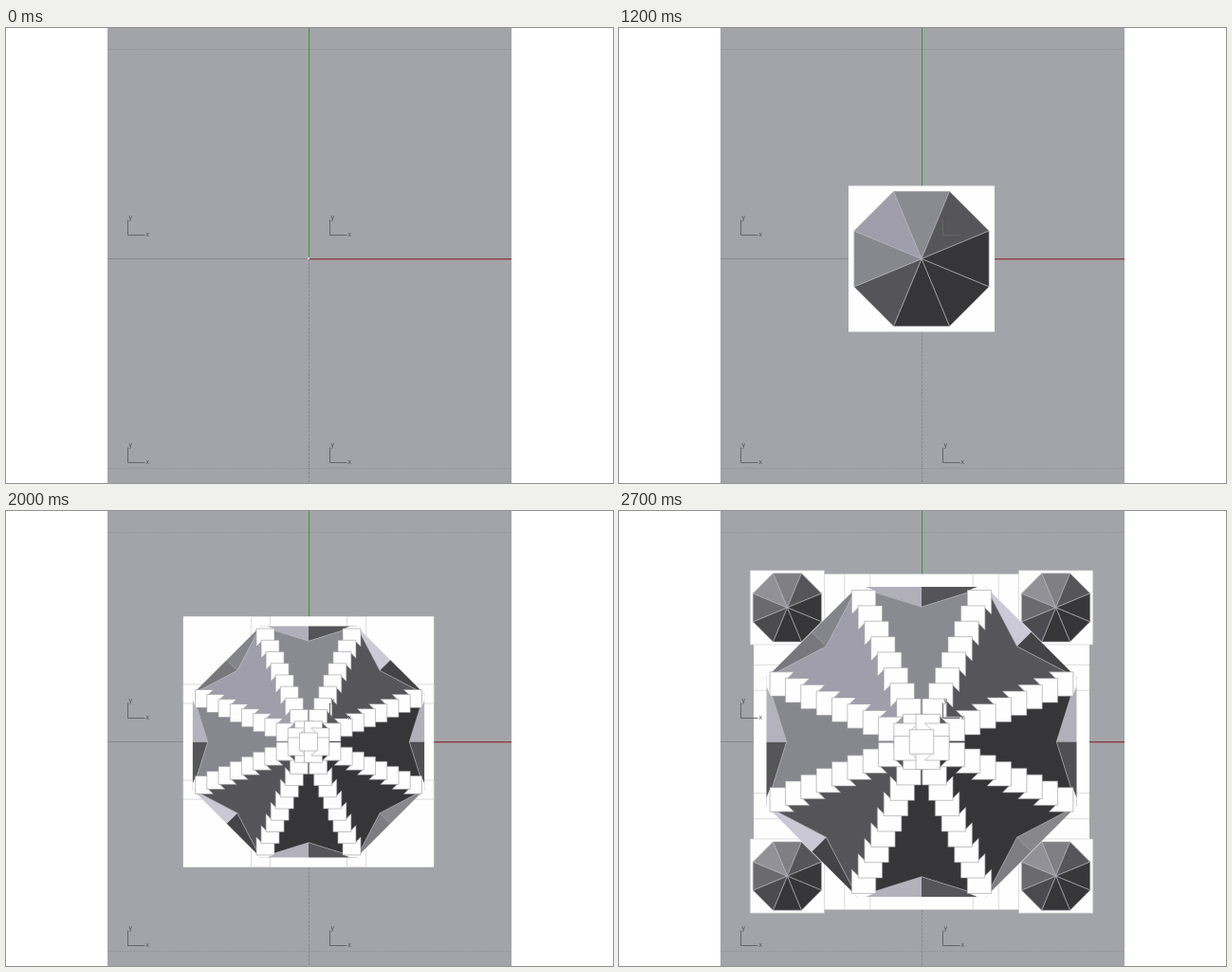
An HTML page with a canvas for the animation above (2900 ms loop, 640 by 480 pixels).

```html
<!DOCTYPE html>
<html>
<head>
<meta charset="utf-8">
<style>
  html, body { margin: 0; height: 100%; overflow: hidden; background: #fff; }
  canvas { display: block; }
</style>
</head>
<body>
<canvas id="stage" width="640" height="480"></canvas>
<script>
const ctx = document.getElementById('stage').getContext('2d');
const LOOP = 2900, STEP = 100, LAST = 27;
const STAIRS_FROM = 15, STAR_FROM = 19, TOWERS_FROM = 26;
const CX = 319, CY = 243.5;
const WHITE = '#fefefe', EDGE = '#b4b2bb', SEAM = '#98989c', FAINT = '#c4c4c8';
const APOTHEM = Math.cos(Math.PI / 8), HALF_SIDE = Math.sin(Math.PI / 8);
const NOTCH = 0.804;

// The uneven growth of a slider dragged by hand: [step, half width]
const GROWTH = [[0, 0], [8, 52.5], [12, 77], [17, 110.5], [18, 119.5], [24, 157.5], [27, 177]];

// Clockwise from the top facet
const ROOF = ['#8a8a91', '#56555a', '#363638', '#363638', '#363638', '#555559', '#87878e', '#a09eaa'];
const TOWER_ROOF = ['#7f7f84', '#56565a', '#38383a', '#363638', '#363638', '#4b4b4f', '#6a6a6f', '#919197'];
const NOTCH_SIDES = [
  ['#b1afba', '#555459'], ['#cbcad6', '#444447'], ['#b1afba', '#505054'], ['#87878c', '#7d7d82'],
  ['#56555a', '#b3b1bc'], ['#444448', '#c9c8d4'], ['#55555a', '#b4b2bd'], ['#77777d', '#84848b']
];

function sizeAt(n) {
  const i = GROWTH.findIndex(([step]) => step >= n);
  const [n0, s0] = GROWTH[Math.max(0, i - 1)], [n1, s1] = GROWTH[i];
  return n === n1 ? s1 : s0 + (s1 - s0) * (n - n0) / (n1 - n0);
}

function polar(radius, eighths) {
  const a = (eighths - 2) * Math.PI / 4;
  return [radius * Math.cos(a), radius * Math.sin(a)];
}

function poly(points, fill, stroke) {
  ctx.beginPath();
  points.forEach(p => ctx.lineTo(p[0], p[1]));
  ctx.closePath();
  ctx.fillStyle = fill;
  ctx.fill();
  if (stroke) {
    ctx.strokeStyle = stroke;
    ctx.stroke();
  }
}

function square(x, y, half, stroke) {
  poly([[x - half, y - half], [x + half, y - half], [x + half, y + half], [x - half, y + half]], WHITE, stroke);
}

function line(x1, y1, x2, y2, color, dash = []) {
  ctx.setLineDash(dash);
  ctx.strokeStyle = color;
  ctx.beginPath();
  ctx.moveTo(x1, y1);
  ctx.lineTo(x2, y2);
  ctx.stroke();
  ctx.setLineDash([]);
}

// Draws in unit coordinates, scaled and moved, with thin lines of constant width
function scaled(x, y, size, draw) {
  ctx.save();
  ctx.translate(x, y);
  ctx.scale(size, size);
  ctx.lineWidth = 0.6 / size;
  draw();
  ctx.restore();
}

// Repeats a drawing made for the upper left rib on all eight ribs
function eachRib(draw) {
  for (const sx of [1, -1]) for (const sy of [1, -1]) for (const swap of [0, 1]) {
    ctx.save();
    ctx.scale(sx, sy);
    if (swap) ctx.transform(0, 1, 1, 0, 0, 0);
    draw();
    ctx.restore();
  }
}

function roof(colors, star) {
  colors.forEach((color, i) => {
    const a = polar(1, i - 0.5), b = polar(1, i + 0.5);
    if (star) {
      const notch = polar(NOTCH, i), mid = polar(APOTHEM, i);
      poly([a, mid, notch], NOTCH_SIDES[i][0]);
      poly([mid, b, notch], NOTCH_SIDES[i][1]);
      poly([[0, 0], a, notch, b], color, EDGE);
    } else {
      poly([[0, 0], a, b], color, EDGE);
    }
  });
}

// Blocks sit at tenths of each rib; the sloping roof cuts off their inner corners
function stairs() {
  const half = 0.072, cut = 0.03;
  eachRib(() => poly([
    [-HALF_SIDE, -APOTHEM], [0.05 - HALF_SIDE, -APOTHEM],
    [half - 0.9 * HALF_SIDE, -0.9], [-half - 0.9 * HALF_SIDE, -0.9]
  ], WHITE));
  for (let tenth = 9; tenth > 0; tenth--) {
    const x = -HALF_SIDE * tenth / 10, y = -APOTHEM * tenth / 10;
    eachRib(() => poly([
      [x - half, y - half], [x + half, y - half], [x + half, y + cut],
      [x - cut, y + cut], [x - half, y + half]
    ], WHITE, SEAM));
  }
  square(0, 0, half, SEAM);
}

function towers(size) {
  for (const sx of [-1, 1]) for (const sy of [-1, 1]) {
    scaled(CX + sx * size * 0.8, CY + sy * size * 0.8, size * 0.221, () => {
      square(0, 0, 1, FAINT);
      roof(TOWER_ROOF, false);
    });
  }
}

function building(n) {
  const size = sizeAt(n), hasStairs = n >= STAIRS_FROM;
  scaled(CX, CY, size, () => {
    square(0, 0, 1);
    if (hasStairs) eachRib(() => square(-HALF_SIDE, -APOTHEM, 1 - APOTHEM, FAINT));
  });
  if (n >= TOWERS_FROM) towers(size);
  scaled(CX, CY, size, () => {
    roof(ROOF, n >= STAR_FROM);
    if (hasStairs) stairs();
  });
}

function viewport() {
  ctx.fillStyle = '#fff';
  ctx.fillRect(0, 0, 640, 480);
  ctx.fillStyle = '#a3a4a9';
  ctx.fillRect(107, 0, 426, 480);
  ctx.lineWidth = 1;
  line(107, 22.5, 533, 22.5, '#95969b', [2, 1]);
  line(107, 464.5, 533, 464.5, '#95969b', [2, 1]);
  line(107, 243.5, 319, 243.5, '#88898e');
  line(319.5, 244, 319.5, 480, '#88898e', [3, 1]);
  line(319, 243.5, 533, 243.5, '#7f4347');
  line(319, 244.5, 533, 244.5, '#a8787c');
  line(319.5, 0, 319.5, 242, '#2f9a35');
  ctx.fillStyle = '#d0d1d4';
  ctx.fillRect(318, 242, 2, 2);
}

function axisIcons() {
  ctx.font = '7px "Liberation Sans", Arial, sans-serif';
  ctx.lineWidth = 1;
  for (const x of [128.5, 341.5]) for (const y of [218.5, 458.5]) {
    line(x, y - 16, x, y, '#65666b');
    line(x, y, x + 18, y, '#65666b');
    ctx.fillStyle = '#505156';
    ctx.fillText('y', x + 1, y - 17);
    ctx.fillText('x', x + 19, y + 1);
  }
}

function frame(now) {
  const n = Math.min(LAST, Math.floor(now % LOOP / STEP));
  viewport();
  if (n > 0) building(n);
  axisIcons();
  requestAnimationFrame(frame);
}
frame(performance.now());
</script>
</body>
</html>
```
